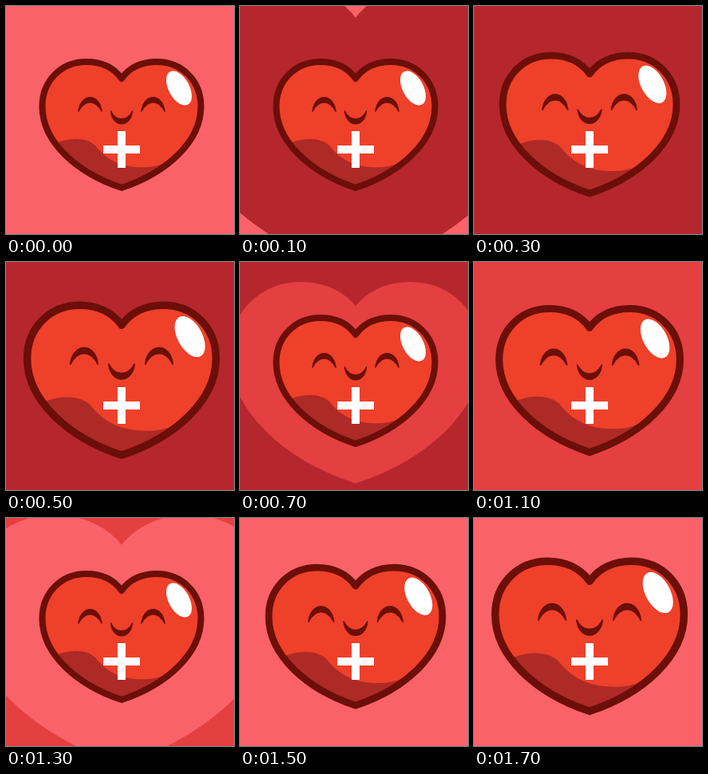
Write an HTML page with a canvas that moves like this. It is 286x286 px and loops after 1.8 s.

```html
<!DOCTYPE html>
<html lang="en">
<head>
<meta charset="utf-8">
<title>Beating heart</title>
<style>
  html, body { margin: 0; width: 100%; height: 100%; overflow: hidden; background: #f96268; }
  canvas { display: block; }
</style>
</head>
<body>
<canvas id="stage" width="286" height="286"></canvas>
<script>
const ctx = document.getElementById('stage').getContext('2d');
const SIZE = 286, STEP = 100, STEPS_PER_BEAT = 6, CENTER_X = 145;
const LINE = '#6b0f08';

// Each beat floods the stage with its colour, then the heart swells to its peak.
const beats = [
  { color: '#b5272d', spread: 2.25, peak: 1.19 },
  { color: '#e43f41', spread: 1.55, peak: 1.14 },
  { color: '#f96268', spread: 1.92, peak: 1.19 }
];

const heart = new Path2D(`M145 91 C135 77 119 70 101 70 C69 70 45.5 94 45.5 126
  C45.5 170 88 209 145 228 C202 209 244.5 170 244.5 126 C244.5 94 221 70 189 70
  C171 70 155 77 145 91Z`);
const wave = new Path2D(`M46 182 C70 163 100 163 112 175 C128 196 150 204 180 202
  C197 200 211 193 228 180 V244 H46Z`);
const eyes = new Path2D(`M91 132 C94 109 117 109 120 132 C112 117 99 117 91 132Z
  M170 132 C173 109 196 109 199 132 C191 117 178 117 170 132Z`);
const smile = new Path2D('M131.5 132 C134 153 156 153 158.5 132 C152 145 138 145 131.5 132Z');

function scaled(scale, centerY, draw) {
  ctx.save();
  ctx.translate(CENTER_X, centerY);
  ctx.scale(scale, scale);
  ctx.translate(-CENTER_X, -centerY);
  draw();
  ctx.restore();
}

function fill(color, path) {
  ctx.fillStyle = color;
  ctx.fill(path);
}

function outline(color, width, path) {
  ctx.strokeStyle = color;
  ctx.lineWidth = width;
  ctx.stroke(path);
}

function drawFace() {
  fill('#ef402a', heart);
  ctx.save();
  ctx.clip(heart);
  fill('#ae2a27', wave);
  ctx.restore();
  outline(LINE, 8, heart);
  for (const feature of [eyes, smile]) {
    fill(LINE, feature);
    outline(LINE, 1.5, feature);
  }

  ctx.beginPath();
  ctx.ellipse(217, 103, 13, 23.5, -0.5, 0, 2 * Math.PI);
  ctx.fillStyle = '#fff';
  ctx.fill();
}

function draw(tick) {
  const index = Math.floor(tick / STEPS_PER_BEAT) % beats.length;
  const step = tick % STEPS_PER_BEAT;
  const beat = beats[index];
  const previous = beats[(index + beats.length - 1) % beats.length];

  ctx.fillStyle = previous.color;
  ctx.fillRect(0, 0, SIZE, SIZE);
  if (step > 0) {
    scaled(beat.spread + 2 * (step - 1), 145, () => {
      fill(beat.color, heart);
      outline(beat.color, 5, heart);
    });
  }

  const progress = Math.max(0, step - 1) / (STEPS_PER_BEAT - 2);
  const swell = (1 - Math.cos(Math.PI * progress)) / 2;
  scaled(1 + (beat.peak - 1) * swell, 152.5, drawFace);

  ctx.fillStyle = '#fff';
  ctx.fillRect(140, 157, 10, 46);
  ctx.fillRect(122, 175, 46, 10);
}

ctx.lineCap = ctx.lineJoin = 'round';
const start = performance.now();
function animate() {
  draw(Math.floor((performance.now() - start) / STEP));
  requestAnimationFrame(animate);
}
animate();
</script>
</body>
</html>
```
